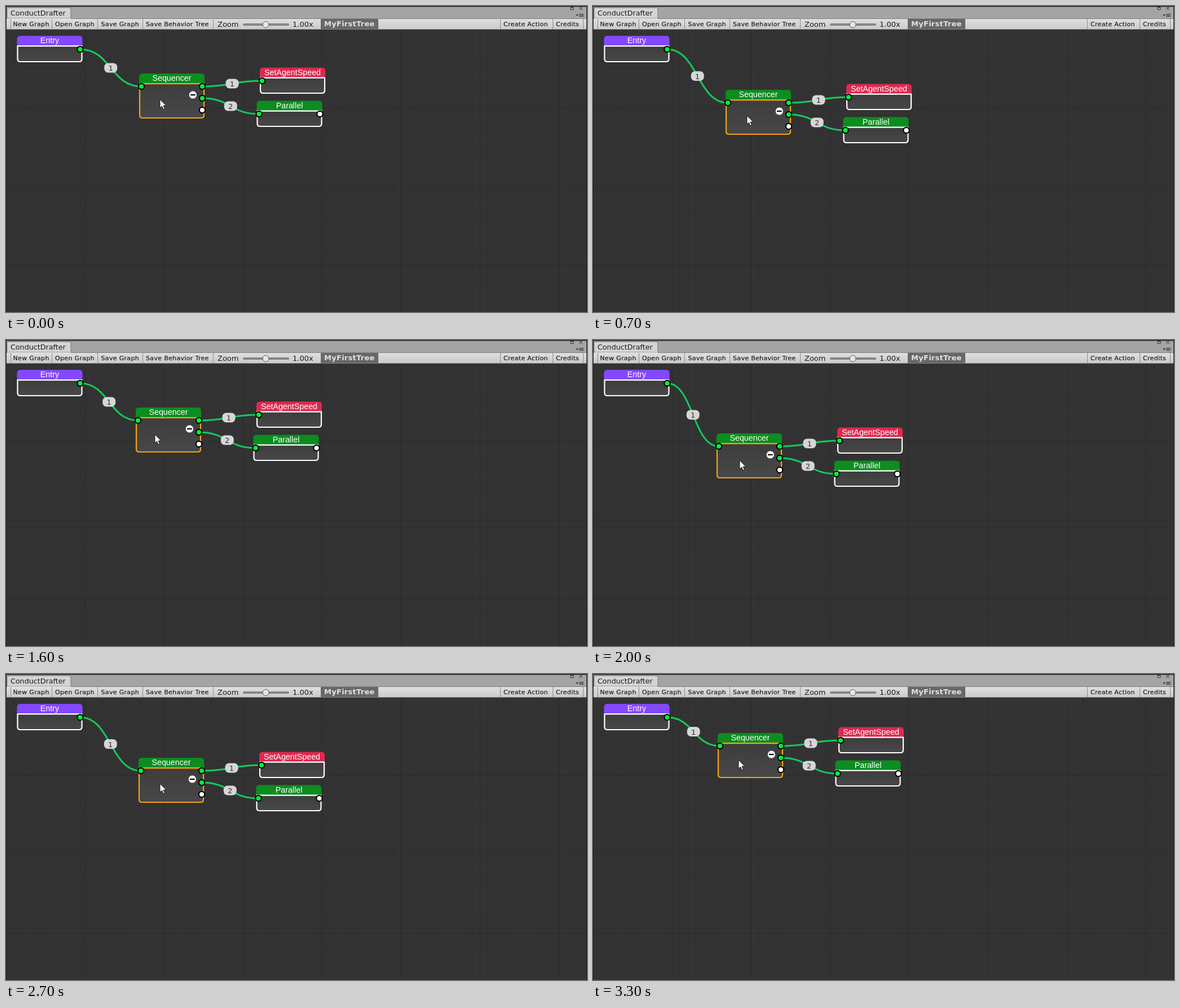
Animation of 1030 by 544 pixels, one loop 3400 ms. Source, as an HTML page:

```html
<!DOCTYPE html>
<html lang="en">
<head>
<meta charset="utf-8">
<title>Node graph</title>
<style>
  html, body { margin: 0; width: 100%; height: 100%; overflow: hidden; background: #323232; }
  svg { display: block; width: 1030px; height: 544px; }
  text { white-space: pre; }
  .ui { font: 11px "DejaVu Sans", sans-serif; letter-spacing: .33px; fill: #1c1c1c; stroke: #1c1c1c; stroke-width: .2; }
  .big { font: 13px "DejaVu Sans", sans-serif; fill: #1c1c1c; }
  .name { font: bold 13px "DejaVu Sans", sans-serif; letter-spacing: .28px; fill: #e2e2e2; }
  .head { font: 14.3px "Liberation Sans", Arial, sans-serif; fill: #fff; text-anchor: middle; }
  .num { font: 13px "DejaVu Sans", sans-serif; fill: #2c2c2c; text-anchor: middle; }
  .wire { fill: none; stroke: #12cc5c; stroke-width: 3; }
</style>
</head>
<body>
<svg id="stage" viewBox="0 0 1030 544">
  <defs>
    <linearGradient id="bar" x2="0" y2="1">
      <stop offset="0" stop-color="#e0e0e0"/><stop offset="1" stop-color="#cbcbcb"/>
    </linearGradient>
    <linearGradient id="fill" x2="0" y2="1">
      <stop offset="0" stop-color="#3d3d3d"/><stop offset="1" stop-color="#484848"/>
    </linearGradient>
    <pattern id="fine" width="14" height="14" y="40" patternUnits="userSpaceOnUse">
      <path d="M.5 0V14M0 .5H14" stroke="#2f2f2f"/>
    </pattern>
    <pattern id="coarse" width="140" height="140" y="40" patternUnits="userSpaceOnUse">
      <path d="M.5 0V140M0 .5H140" stroke="#2a2a2a"/>
    </pattern>
  </defs>

  <rect width="1030" height="544" fill="#333"/>
  <rect y="41" width="1030" height="503" fill="url(#fine)"/>
  <rect y="41" width="1030" height="503" fill="url(#coarse)"/>

  <rect width="1030" height="22" fill="#a4a4a4"/>
  <rect width="1030" height="1.5" fill="#222"/>
  <path d="M2 22V5q0-2 2-2H112q3 0 3 3V22z" fill="#d4d4d4" stroke="#777"/>
  <text class="big" x="8" y="17" style="font-size:12.7px">ConductDrafter</text>
  <g fill="none" stroke="#333">
    <path d="M1001 2.5h5v4h-5zM1001 1.5h5M1016 1l6 6M1022 1l-6 6"/>
    <path d="M1016 14.5h8M1016 16.5h8M1016 18.5h8"/>
    <path d="M1010 15h5l-2.5 3z" fill="#333" stroke="none"/>
  </g>
  <rect y="22" width="1030" height="19" fill="url(#bar)"/>
  <path d="M0 22.5H2M115 22.5H1030M0 41.5H1030" stroke="#808080"/>
  <g id="tools"></g>
  <text class="big" x="375" y="37">Zoom</text>
  <rect x="420.5" y="31.5" width="81" height="3" rx="1.5" fill="#8a8a8a" stroke="#707070" stroke-width=".8"/>
  <circle cx="460.5" cy="33" r="5.5" fill="#e6e6e6" stroke="#555"/>
  <text class="big" x="508" y="37">1.00x</text>
  <rect x="558" y="23" width="102" height="18" fill="#686868"/>
  <text class="name" x="564" y="36">MyFirstTree</text>
  <path d="M.5 0V544M1029.5 0V544" stroke="#1a1a1a"/>

  <g id="graph"></g>
  <path id="cursor" d="M0 0V15.2L3.5 12L6 17.6L8.4 16.5L6 11.1H10.8z" fill="#fff" stroke="#111" stroke-width=".9"/>
</svg>

<script>
const STEP = 100, LAST = 17;
const GREEN = '#00f03c', WHITE = '#fff';

// node x, node y, pointer offset x, pointer offset y
const drag = [
  [236, 120, 37, 46], [221, 105, 37, 48], [202, 107, 35, 49],
  [186, 120, 35, 52], [180, 138, 39, 52], [196, 157, 40, 51],
  [221, 161, 40, 48], [235, 149, 38, 46], [235, 129, 37, 45],
  [226, 114, 35, 47], [210, 110, 34, 50], [193, 121, 34, 55],
  [182, 139, 37, 54], [193, 161, 40, 52], [219, 166, 41, 48],
  [240, 148, 38, 45], [230, 120, 34, 48], [211, 107, 35, 49]
];

const $ = id => document.getElementById(id);

const label = (cls, x, y, s) => `<text class="${cls}" x="${x}" y="${y}">${s}</text>`;

const port = (x, y, color) =>
  `<circle cx="${x}" cy="${y}" r="6.2" fill="#000"/><circle cx="${x}" cy="${y}" r="4.1" fill="${color}"/>`;

function node(x, y, title, color, height, border = WHITE) {
  return `<g transform="translate(${x} ${y})">
    <path d="M0 18V6Q0 0 6 0H110Q116 0 116 6V18z" fill="${color}"/>
    <path d="M1 18.2H115V${height - 6}q0 5-5 5H6q-5 0-5-5z" fill="url(#fill)"
      stroke="${border}" stroke-width="2.2" stroke-linejoin="round"/>
    ${label('head', 58, 13, title)}</g>`;
}

function wire(x1, y1, x2, y2) {
  const mid = (x1 + x2) / 2;
  return `<path class="wire" d="M${x1} ${y1}C${mid} ${y1} ${mid} ${y2} ${x2} ${y2}"/>`;
}

function badge(x1, y1, x2, y2, n) {
  const x = (x1 + x2) / 2, y = (y1 + y2) / 2;
  return `<rect x="${x - 11.5}" y="${y - 8.5}" width="23" height="17" rx="7" fill="#d6d6d6"/>` +
    label('num', x, y + 5, n);
}

function graph(x, y) {
  const links = [
    [131.5, 77, x + 4, y + 23, 1],
    [x + 112, y + 23, x + 218, y + 13, 1],
    [x + 112, y + 44, x + 212.5, y + 72, 2]
  ];
  return links.map(l => wire(...l)).join('') +
    node(19.5, 53, 'Entry', '#8448ff', 47) +
    node(x, y, 'Sequencer', '#0b8d20', 80, '#f5a314') +
    node(x + 214, y - 10.5, 'SetAgentSpeed', '#de2950', 46.5) +
    node(x + 208.5, y + 48.5, 'Parallel', '#0b8d20', 46.5) +
    links.map(l => port(l[0], l[1], GREEN) + port(l[2], l[3], GREEN)).join('') +
    port(x + 112, y + 65, WHITE) + port(x + 320.5, y + 72, WHITE) +
    `<circle cx="${x + 95.3}" cy="${y + 38}" r="7" fill="#fff" stroke="#222" stroke-width=".6"/>
     <path d="M${x + 91} ${y + 38}h8.6" stroke="#000" stroke-width="2.2"/>` +
    links.map(l => badge(...l)).join('');
}

$('tools').innerHTML =
  [[12.5, 'New Graph'], [87, 'Open Graph'], [168.5, 'Save Graph'],
   [248, 'Save Behavior Tree'], [882, 'Create Action'], [975, 'Credits']]
    .map(([x, s]) => label('ui', x, 36, s)).join('') +
  [8, 81, 162, 242, 367, 876, 969, 1023]
    .map(x => `<path d="M${x + .5} 23V41" stroke="#8d8d8d"/>`).join('');

// The drag runs forward, then back along the same poses.
function draw(ms) {
  const i = Math.floor(ms / STEP) % (2 * LAST);
  const [x, y, dx, dy] = drag[Math.min(i, 2 * LAST - i)];
  $('graph').innerHTML = graph(x, y);
  $('cursor').setAttribute('transform', `translate(${x + dx} ${y + dy})`);
}

let start, shown = -1;
function tick(now) {
  start ??= now;
  const step = Math.floor((now - start) / STEP);
  if (step !== shown) draw((shown = step) * STEP);
  requestAnimationFrame(tick);
}
draw(0);
requestAnimationFrame(tick);
</script>
</body>
</html>
```
